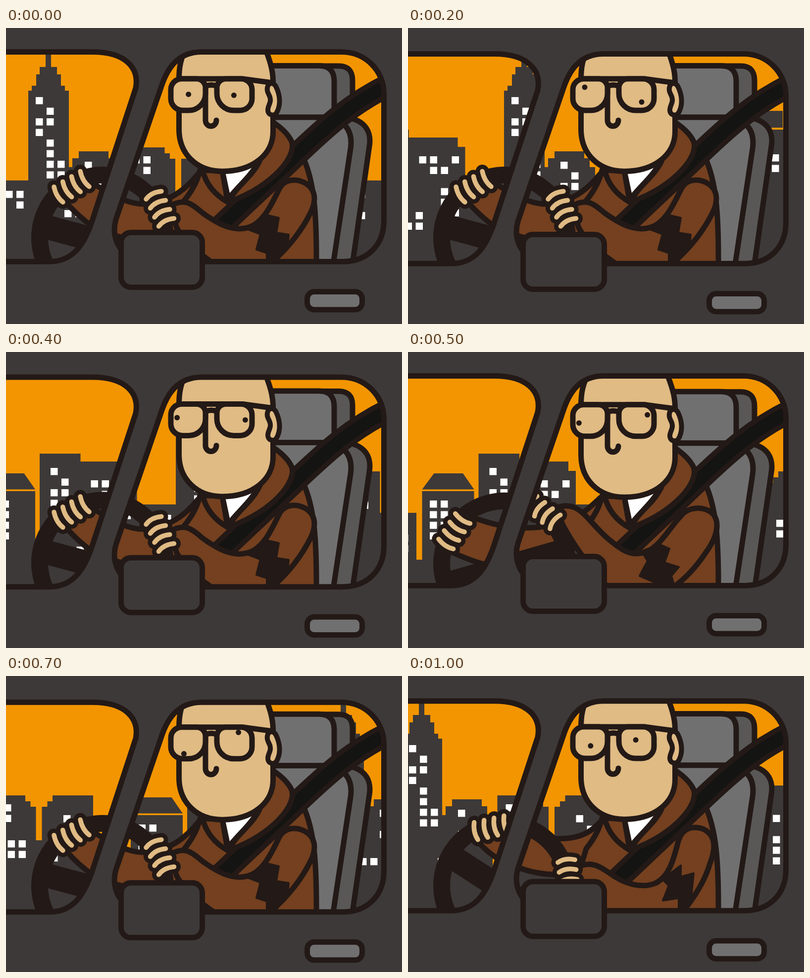
These frames come from a looping animation (800 px wide and 600 px high, 1100 ms). An HTML page:

```html
<!DOCTYPE html>
<html lang="en">
<head>
<meta charset="utf-8">
<title>Night drive</title>
<style>
  html, body { margin: 0; width: 100%; height: 100%; overflow: hidden; background: #3d3938; }
  svg { display: block; width: 800px; height: 600px; }
  .line { fill: none; stroke: #231916; stroke-width: 11; stroke-linecap: round; stroke-linejoin: round; }
  .city { fill: #3d3938; }
  .sky { fill: #f39500; }
  .coat { fill: #74401f; }
  .skin { fill: #e0bb84; }
  .light { fill: #717071; }
  .mid { fill: #595857; }
  .ink { fill: #231916; }
  .white { fill: #fff; }
  .rim { stroke-width: 34; }
  .ear { stroke-width: 10; }
  .strap-edge { stroke-width: 47; }
  .strap { stroke: #141412; stroke-width: 26; }
  .shade { fill: #231916; stroke-width: 4; }
  .knuckle { stroke-width: 27; }
  .finger { stroke: #e0bb84; stroke-width: 9.5; }
</style>
</head>
<body>
<svg viewBox="0 0 800 600">
  <defs>
    <path id="stairs" d="M238.5,430 V242 h82 v12 h10.5 v11 h11 V430 Z"/>
    <g id="downtown">
      <g class="city">
        <path d="M45,430 V127 h7 v-10 h9 V94 h7 V79 h12 V0 h11 V79 h12 v15 h8 v23 h8 v10 h8 V430 Z"/>
        <path d="M127,430 V282 h7 v-18 h13 v-14 h60 v14 h11 v18 h11 V430 Z"/>
        <use href="#stairs"/>
        <use href="#stairs" transform="matrix(-1 0 0 1 696 0)"/>
        <path d="M341,430 V333 H355 V430 Z M457,430 V326 H522 V430 Z"/>
      </g>
      <path class="white" id="downtownLights"/>
    </g>
    <g id="suburb">
      <path class="city" d="M533.5,430 V282 h105 V430 Z M557.5,246 H616 L638.5,278.5 H533.5 Z
        M647.5,430 V206 H730 v16 h99 v19 h15 v68 h79 V430 Z"/>
      <path class="white" id="suburbLights"/>
    </g>
    <g id="outskirts">
      <path class="city" d="M560,168 h48 v34 h-48 Z M560,430 V206 h60 V309 H860 V430 Z"/>
      <path class="white" id="outskirtsLights"/>
    </g>
    <path id="panes" d="M-20,48.5 H175 C240,48.5 270,80 262,122 L176,385 C160,435 138,473.5 88,473.5 H-20 Z
      M395,48.5 H678 C725,48.5 763.5,85 763.5,135 V390 C763.5,440 730,473.5 680,473.5 H290 C235,473.5 210,430 222,388 L314,118 C325,85 345,48.5 395,48.5 Z"/>
  </defs>

  <rect class="sky" width="800" height="600"/>
  <rect class="city" y="421" width="800" height="179"/>
  <g id="scene">
    <g transform="translate(-877.5)"><use href="#downtown"/><use href="#suburb"/></g>
    <use href="#downtown"/><use href="#outskirts"/>
  </g>

  <g id="cabin">
    <!-- seat -->
    <path class="line mid" d="M560,77 H672 Q700,77 700,106 V195 H560 Z"/>
    <path class="line light" d="M520,76.5 H632 Q663,76.5 663,108 V181 H520 Z"/>
    <path class="line mid" d="M640,183 C720,170 740,205 734,240 L699,485 H600 Z"/>
    <path class="line light" d="M530,181 H640 C680,181 702,205 696,245 L660,485 H530 Z"/>

    <path id="farArm" class="line coat"/>
    <g id="wheel">
      <g transform="translate(195 425) rotate(15)">
        <circle class="line rim" r="127"/>
        <rect class="ink" x="-115" y="-16" width="230" height="49"/>
      </g>
    </g>

    <!-- coat, belt, then the collar on top -->
    <path class="line coat" d="M392,288 C386,315 372,335 360,350 L351,380 V490 H627 C628,370 622,310 600,262 L545,195 Z"/>
    <path class="line strap-edge" d="M785,110 C700,150 650,196 575,268 L400,434"/>
    <path class="line strap" d="M785,110 C700,150 650,196 575,268 L400,434"/>
    <path class="line white" d="M437,290 L449,347 C465,325 495,300 510,272 Z"/>
    <path class="line coat" d="M397,288 C405,320 425,340 448,353 L437,290 Z"/>
    <path class="line coat" d="M512,270 C495,305 465,320 449,353 C540,320 588,260 577,230 C570,215 558,203 538,190 Z"/>

    <path id="nearArm" class="line coat"/>
    <path id="shade" class="line shade"/>
    <g id="hands"></g>

    <!-- head -->
    <path class="line skin" d="M368,32 C352,62 349.5,80 349.5,105 V205 C349.5,255 385,290.5 437,290.5 C500,290.5 539.5,255 539.5,210 V108 C539.5,85 533,65 520,32 Z"/>
    <path class="line skin ear" d="M528,121 C530,110 540,110 545,118 C555,138 555,158 546,173 C540,180 528,176 529,165 C530,156 535,152 534,144 C533,134 526,132 528,121 Z"/>
    <path class="line" d="M350,103 H478 L538,111 M403,118 Q415,113 426,118 M403,118 V187 a11,12 0 0 0 22,0"/>
    <path class="line skin" d="M355,103 H385 a18,18 0 0 1 18,18 V133 a34,34 0 0 1 -34,34 H357 a24,24 0 0 1 -24,-24 V125 a22,22 0 0 1 22,-22 Z"/>
    <path class="line skin" d="M444,103 H475 a22,22 0 0 1 22,22 V143 a24,24 0 0 1 -24,24 H460 a34,34 0 0 1 -34,-34 V121 a18,18 0 0 1 18,-18 Z"/>
  </g>
  <circle id="eyeL" class="ink" r="5.5"/>
  <circle id="eyeR" class="ink" r="5.5"/>

  <g id="car">
    <path class="city" fill-rule="evenodd" id="door"/>
    <use href="#panes" class="line"/>
    <rect class="line city" x="232.5" y="414.5" width="164" height="111" rx="20"/>
    <rect class="line light" x="608.5" y="534.5" width="111" height="36.5" rx="14"/>
  </g>
</svg>

<script>
const $ = id => document.getElementById(id);
const { sin, cos, PI } = Math;

// Lit windows on a regular grid; rows are separated by spaces, '#' is lit.
function lit(x, y, rows) {
  return rows.split(' ').map((row, r) => [...row].map((cell, c) =>
    cell === '#' ? `M${x + c * 22},${y + r * 21.5}h14.5v14.5h-14.5Z` : '').join('')).join('');
}
$('downtownLights').setAttribute('d',
  lit(60, 140, '# .# ## # .# .# .## .##') + lit(159, 271, '# .# ##') + lit(118, 369, '##') +
  lit(255.5, 260, '## .#') + lit(285, 333, '## ##') +
  lit(371.5, 340, '# #') + lit(397.5, 282, '# .#') + lit(491, 370, '# #'));
$('suburbLights').setAttribute('d',
  lit(549, 301, '## ## ## ##') + lit(669.5, 235, '# .# ## #') + lit(722, 373, '.# ##') +
  lit(751, 260, '##.# .## . ..## ..# ..##') + lit(876.5, 330, '## .#'));
$('outskirtsLights').setAttribute('d', lit(586, 256, '# #') + lit(711, 330, '# . #'));

$('door').setAttribute('d', 'M-20,-20 H820 V640 H-20 Z ' + $('panes').getAttribute('d'));

// Four equal fingers laid side by side.
function fist(x, y, dx, dy, curl) {
  const d = [0, 1, 2, 3].map(i => `M${x + i * dx},${y + i * dy}q${curl}`).join('');
  return `<path class="line knuckle" d="${d}"/><path class="line finger" d="${d}"/>`;
}
$('hands').innerHTML = fist(97, 322, 17.7, -10.5, '4,20 18,31') + fist(283, 347, 8.5, 18.3, '10,-14 31,-16');

const straight = {
  turn: 0, grip: 0,
  farArm: 'M388,296 C370,318 340,352 280,357 C240,357 210,335 150,300 L120,352 C140,375 160,392 175,402 L230,425 L380,440 Z',
  nearArm: 'M330,362 C365,340 380,362 400,377 C430,398 465,418 500,400 C525,385 540,350 550,330 C560,305 585,305 602,313 C626,325 628,350 615,375 C595,415 570,445 540,472 L535,490 H435 C400,460 370,450 345,405 Z',
  shade: 'M488,408 L530,380 L551,385 L546,415 L571,419 L569,440 L545,474 H527 V456 L506,449 L514,418 Z'
};
const left = {
  turn: -31, grip: -26,
  farArm: 'M388,292 C360,318 340,338 295,347 C245,355 200,360 115,325 L95,405 C130,420 145,425 158,427 C200,420 250,400 305,388 L380,400 Z',
  nearArm: 'M300,312 C345,295 360,335 400,371 C430,397 450,412 480,402 C510,390 530,350 550,330 C565,308 600,308 617,325 C635,350 615,385 600,405 C580,435 560,455 540,470 L520,490 H420 C390,460 340,400 312,345 Z',
  shade: 'M472,400 L508,386 L528,395 L518,423 L547,432 L532,450 L538,470 H500 V464 L468,450 L484,420 Z'
};
const right = {
  turn: 18, grip: 18,
  farArm: 'M388,296 C365,322 340,330 300,330 C260,320 200,310 160,310 L140,335 C165,362 190,380 228,390 C255,400 280,403 310,403 L380,420 Z',
  nearArm: 'M330,395 C365,370 385,385 405,398 C440,425 475,430 500,420 C530,405 538,365 546,335 C555,305 578,304 596,310 C622,322 622,350 610,380 C600,415 580,445 560,472 L555,490 H400 C380,460 350,440 340,410 Z',
  shade: 'M514,412 L551,384 V407 L577,400 L573,440 L560,472 H547 V450 L515,455 L527,425 Z'
};

const FRAME = 100, FRAMES = 11, SPEED = 74.5;

const place = (id, x, y) => $(id).setAttribute('transform', `translate(${x} ${y})`);
const rotate = (id, angle) => $(id).setAttribute('transform', `rotate(${angle} 195 425)`);

function draw(i) {
  // A twelve-step cycle that skips one step past the middle.
  const s = i < 7 ? i : i + 1;
  const pose = s === 5 ? left : s === 11 ? right : straight;

  place('scene', s * SPEED, 0);
  // Two bumps in the road; the seat sinks once, later.
  place('car', 0, s < 5 ? 4.2 * sin(PI * s / 5) : 5 * sin(PI * (s - 5) / 7));
  place('cabin', 0, s > 2 && s < 9 ? 4 * sin(PI * (s - 2) / 7) ** 2 : 0);

  // The eyes roll opposite each other.
  const roll = (14 + 30 * s + 32 * sin(PI * s / 12)) * PI / 180;
  place('eyeL', 357 + 12 * cos(roll), 139 - 19 * sin(roll));
  place('eyeR', 472 - 12 * cos(roll), 132 + 18 * sin(roll));

  for (const part of ['farArm', 'nearArm', 'shade']) $(part).setAttribute('d', pose[part]);
  rotate('wheel', pose.turn);
  rotate('hands', pose.grip);
}

const start = performance.now();
let shown = -1;
function tick() {
  const i = Math.floor((performance.now() - start) / FRAME) % FRAMES;
  if (i !== shown) draw(shown = i);
  requestAnimationFrame(tick);
}
tick();
</script>
</body>
</html>
```
